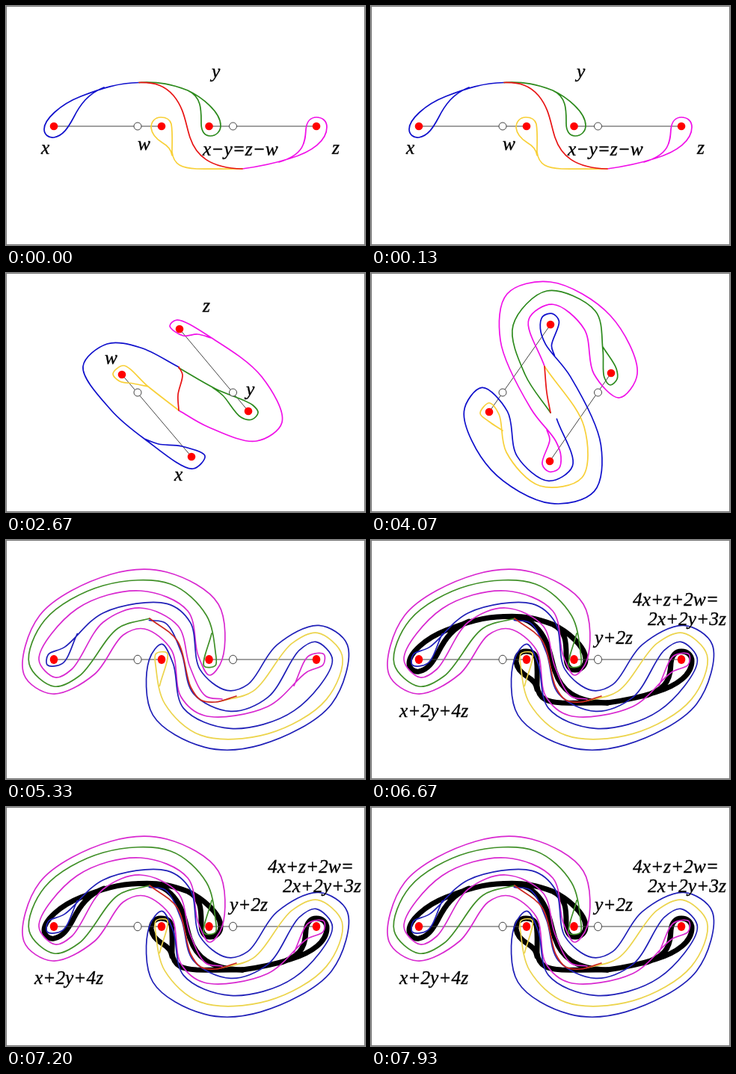
Write an HTML page that moves like this. It is 480 by 320 pixels and loops after 8000 ms.

```html
<!DOCTYPE html>
<html lang="en">
<head>
<meta charset="utf-8">
<title>Train track</title>
<style>
  html, body { margin: 0; width: 100%; height: 100%; overflow: hidden; background: #fff; }
  svg { display: block; width: 480px; height: 320px; }
  path { fill: none; stroke-width: 1.7; stroke-linecap: round; stroke-linejoin: round; }
  .thick path { stroke: #000; stroke-width: 7; }
  text { font: italic 25.4px "Liberation Serif", "Times New Roman", serif; stroke: #000; stroke-width: 0.35; }
</style>
</head>
<body>
<svg id="stage" viewBox="0 0 480 320"></svg>
<script>
const LOOP = 8000;
const BRIGHT = { pink: '#f010e8', blue: '#1010cc', green: '#2c8a1c', gold: '#f8d038', red: '#e81414' };
const MUTED = { pink: '#d828d0', blue: '#2020b8', green: '#409028', gold: '#ecd44c', red: '#cc2820' };
const PARTNER = { pink: 'blue', blue: 'pink', green: 'gold', gold: 'green' };
const stage = document.getElementById('stage');

function add(parent, tag, attrs, text) {
  const el = document.createElementNS('http://www.w3.org/2000/svg', tag);
  for (const k in attrs) el.setAttribute(k, attrs[k]);
  if (text) el.textContent = text;
  parent.appendChild(el);
  return el;
}

// Centripetal Catmull-Rom spline through "x,y x,y ..."
function spline(str) {
  const p = str.split(' ').map(s => s.split(',').map(Number));
  const n = p.length - 1;
  const mirror = (a, b) => [2 * a[0] - b[0], 2 * a[1] - b[1]];
  const at = i => i < 0 ? mirror(p[0], p[1]) : i > n ? mirror(p[n], p[n - 1]) : p[i];
  const gap = (a, b) => Math.sqrt(Math.hypot(a[0] - b[0], a[1] - b[1]));
  const handle = (a, b, c) => {
    const d = gap(a, b), e = gap(b, c);
    return [0, 1].map(k =>
      (d * d * c[k] - e * e * a[k] + (2 * d * d + 3 * d * e + e * e) * b[k]) / (3 * d * (d + e)));
  };
  let out = 'M' + p[0];
  for (let i = 0; i < n; i++) {
    out += 'C' + [handle(at(i - 1), p[i], p[i + 1]), handle(at(i + 2), p[i + 1], p[i]), p[i + 1]].join(' ');
  }
  return out;
}

const flat = {
  blue: 'M178 102.5C150 103 128 110 100 121C72 132 51 152 51 165C51 172 57 177 64 176C76 174 83 163 90 150C99 132 110 117 131 109',
  green: 'M178 102.5C205 101 222 105 243 113C262 122 287 142 287 160C287 168 281 174 273 174C265 174 261 167 261 157C261 140 262 122 243 113',
  gold: 'M316 218C300 218 280 218.5 255 218C237 217 224 214 222 195C222 182 223 170 221 158C219 151 213 149 207 149C199 149 194 155 194 163C195 172 201 178 209 183C216 187 221 192 222 200',
  pink: 'M316 218C338 215 358 211 380 204C410 195 429 180 429 162C429 154 423 149 415 149C407 149 402 155 401 165C400 182 399 199 365 209',
  red: 'M178 102.5C200 102 213 107 224 120C239 138 240 158 246 176C254 200 272 217 316 218'
};

const tilted = {
  blue: '231,126 180,100 135,95 103,125 140,183 185,222 250,262 266,245 235,232 204,229 185,222',
  green: '231,127 280,155 330,177 337,187 329,196 314,193 290,164 276,153',
  gold: '231,184 190,152 157,124 143,135 152,145 170,148 190,152',
  pink: '231,184 270,206 335,225 369,200 342,139 275,87 228,63 219,71 237,84 256,82 275,87',
  red: '231,126 236,136 230,163 231,184'
};

const upright = {
  pink: '235,210 239,223 229,256 238,266 251,262 254,246 247,225 214,182 173,90 182,28 240,12 320,57 356,135 332,167 298,135 285,75 243,42 211,62 232,125',
  green: '240,187 206,136 190,70 235,24 300,51 310,103 312,140 320,150 329,142 328,128 310,99',
  gold: '232,125 285,206 282,274 226,285 181,240 171,189 158,174 146,188 158,199 176,211',
  red: '232,125 235,160 240,187'
};

const wound = {
  pink: '289,213 267,209 246,170 230,115 180,91 130,110 88,173 66,184 44,160 95,92 180,68 243,95 257,155 272,181 289,160 284,86 215,43 140,46 45,101 24,180 62,206 118,180 157,127 185,119 221,147 234,210 265,235 350,223 402,177 424,167 425,153 405,155 385,195',
  green: '192,105 150,118 98,182 64,196 31,166 52,107 130,61 220,59 268,101 280,150 280,168 265,169 275,125',
  red: '192,105 229,135 247,197 260,214 280,217 308,209'
};

// A strand that is not given is its partner under a half turn of the stage.
function drawCurves(g, curves, colors) {
  for (const c in colors) {
    const s = curves[c] || curves[PARTNER[c]];
    const path = add(g, 'path', { d: s[0] === 'M' ? s : spline(s), stroke: colors[c] });
    if (!curves[c]) path.setAttribute('transform', 'rotate(180 240.2 160.2)');
  }
}

// Each rod has its ends at (pivot ± dx, pivot ± dy), given as [x1, y1, x2, y2].
function scene(start, { curves, rods, mid = 160, labels = [], under, colors = BRIGHT, tall = 1 }) {
  const g = add(stage, 'g', {});
  if (under) drawCurves(add(g, 'g', { class: 'thick' }), under, colors);
  for (const [x1, y1, x2, y2] of rods) add(g, 'line', { x1, y1, x2, y2, stroke: '#444', 'stroke-width': 1 });
  drawCurves(g, curves, colors);
  for (const cx of [176, 303.5]) {
    add(g, 'ellipse', { cx, cy: mid, rx: 5, ry: 5 * tall, fill: '#fff', stroke: '#444' });
  }
  for (const [x1, y1, x2, y2] of rods) {
    for (const [cx, cy] of [[x1, y1], [x2, y2]]) {
      add(g, 'ellipse', { cx, cy, rx: 5.3, ry: 5.3 * tall, fill: '#f00' });
    }
  }
  for (const [s, x, y] of labels) add(g, 'text', { x, y }, s);
  return { start, g };
}

const level = y => [[64, y, 208, y], [271.5, y, 415, y]];
const woundLook = { curves: wound, rods: level(160), colors: MUTED, tall: 1.15 };

const scenes = [
  scene(0, {
    curves: flat, rods: level(161), mid: 161,
    labels: [['x', 47, 198], ['y', 275, 96], ['w', 176, 193], ['z', 436, 198], ['x−y=z−w', 263, 200]]
  }),
  scene(2670, {
    curves: tilted, rods: [[155, 136, 248, 246], [232, 75, 324, 185]],
    labels: [['z', 263, 52], ['w', 132, 122], ['y', 321, 164], ['x', 225, 278]]
  }),
  scene(4070, { curves: upright, rods: [[158, 186, 240, 69], [239, 252, 321, 134]] }),
  scene(5330, woundLook),
  scene(6670, {
    ...woundLook, under: flat,
    labels: [['4x+z+2w=', 350, 88], ['2x+2y+3z', 370, 114], ['y+2z', 299, 139], ['x+2y+4z', 38, 237]]
  })
];
add(stage, 'rect', { x: 0.5, y: 0.5, width: 479, height: 319, fill: 'none', stroke: '#777' });

const t0 = performance.now();
function draw() {
  const t = (performance.now() - t0) % LOOP;
  const now = scenes.filter(s => s.start <= t).pop();
  for (const s of scenes) s.g.style.display = s === now ? '' : 'none';
  requestAnimationFrame(draw);
}
draw();
</script>
</body>
</html>
```
